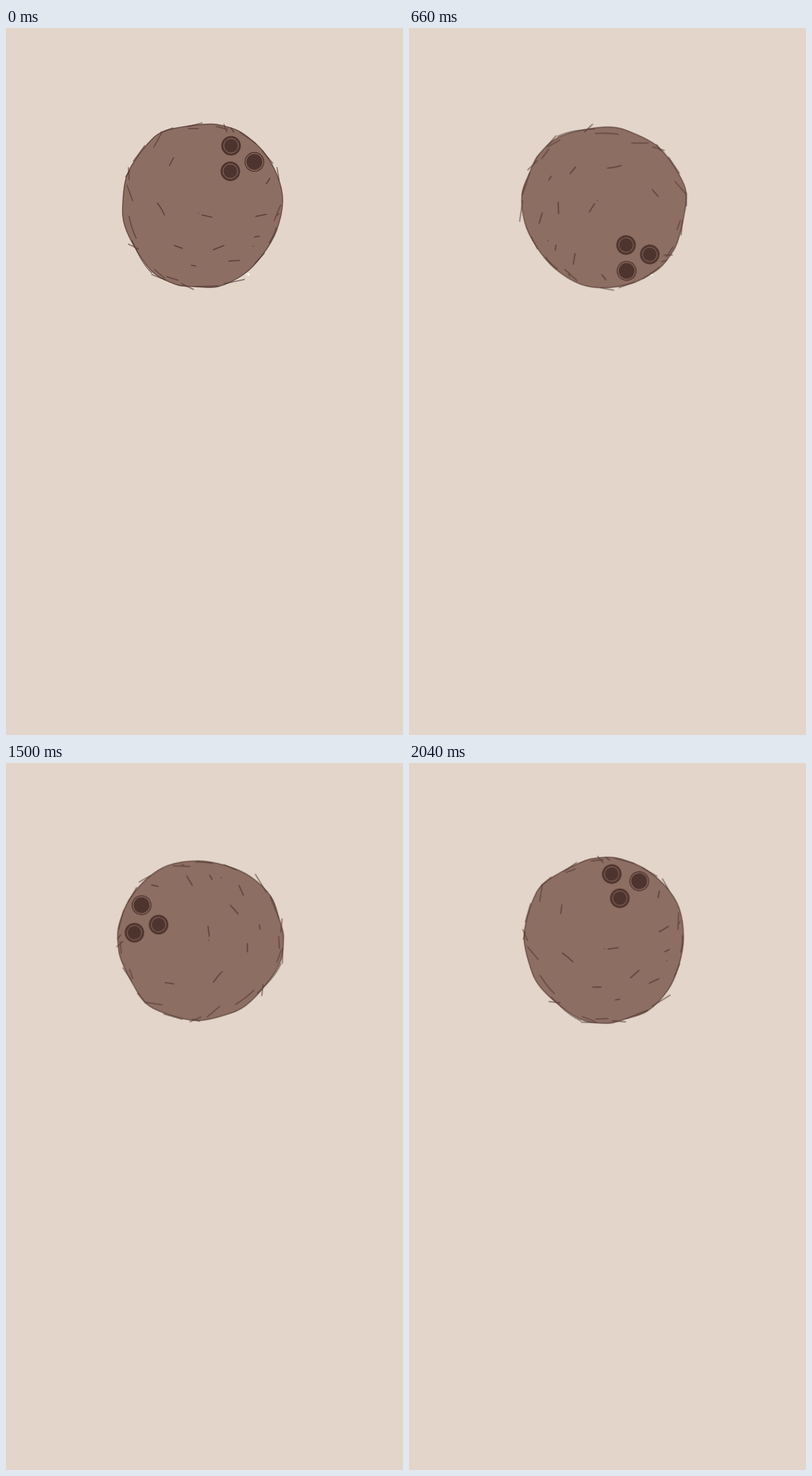
An HTML page without scripts for the animation above (2.1 s loop, 561 by 998 pixels).

```html
<!DOCTYPE html>
<html lang="en">
<head>
<meta charset="utf-8">
<title>Rolling coconut</title>
<style>
  html, body { margin: 0; width: 100%; height: 100%; overflow: hidden; background: #e3d5ca; }
  svg { display: block; width: 100%; height: 100%; }
  .nut { transform-origin: 275.4px 250.7px; animation: roll 2.1s steps(35, end) infinite; }
  .glint { fill: #fbf8f4; animation: glint 2.1s step-end infinite; }
  .shell { fill: #8d6e63; stroke: #4e342e; stroke-opacity: .75; stroke-width: 1.4; }
  .hair { fill: none; stroke: #4e342e; stroke-opacity: .8; stroke-width: 1.5; stroke-linecap: round; }
  .rim { stroke-opacity: .65; stroke-width: 1.5; }
  .dark { fill: #4e342e; }
  .ring { fill: none; stroke: #8d6e63; stroke-width: 1; }
  .edge { fill: #8d6e63; stroke: #4e342e; stroke-width: 1.4; }
  /* ten degrees per step; the loop closes with a small jump */
  @keyframes roll { to { transform: rotate(350deg); } }
  @keyframes glint { 0% { opacity: 1; } 52% { opacity: 0; } }
</style>
</head>
<body>
<svg viewBox="0 0 561 998">
  <defs>
    <g id="hole">
      <circle class="dark" r="13.8"/>
      <circle class="ring" r="10.3"/>
    </g>
  </defs>

  <g class="glint">
    <circle cx="342.5" cy="348" r="2"/>
    <circle cx="338.5" cy="346.5" r="1"/>
  </g>

  <g class="nut">
    <path class="shell" d="M391 243C391 255.5 387.2 272.7 382.4 285.7S369.8 310.6 362 321
      345.9 340.7 335.5 348 311.5 362.2 299.7 365 276 365.5 265 365 249.3 365.2 240 362
      217.8 353.3 209 346 193.8 329 187 318 171.7 291.7 168 280 164.3 260.5 165 248
      166 219 172 205 191.5 173 200.5 163 213 149.5 226 145 265.5 137.2 279 136
      298.3 136 307 138 322 141 332 147 358 166.5 366 177.5 379.9 199.2 384 210
      391 230.5 391 243Z"/>

    <path class="hair" d="M237 183l-6 11M214 247q6 8 10 17M277 264l14 3M353 266l15-3M351 295l7-1
      M293 313l15-6M238 307l11 4M315 329l15-1M262 335l6 1M373 212l-5 8
      M272 261.5h.2M349 308h.2M355 265v.5"/>

    <path class="hair rim" d="M173 197l1 17M169 210l6-8M171 222l8 22M174 266q3 16 10 31M173 305l14 7
      M180 188l16-22M209 168l11-20M219 147l17-6M258 142h14M257 139l20-5
      M297 139l16 4M308 136l4 11M318 141l4 6M330 147l23 16M362 173l15 18
      M383 197l3 18M388 250l-9 22M386 262l-5 4M382 282q-4 12-10 21M365 318l-13 14
      M308 361l29-6M268 365l32-1M248 361l17 8M227 351l16 5M210 341l14 12
      M186 317q8 17 20 29M178 300l8 17M206 348l20 8"/>

    <use href="#hole" x="318" y="166.2"/>
    <use href="#hole" x="317" y="202.2"/>
    <g transform="translate(351 189.1)">
      <circle class="edge" r="13.3"/>
      <circle class="dark" r="11.3"/>
    </g>
  </g>
</svg>
</body>
</html>
```
